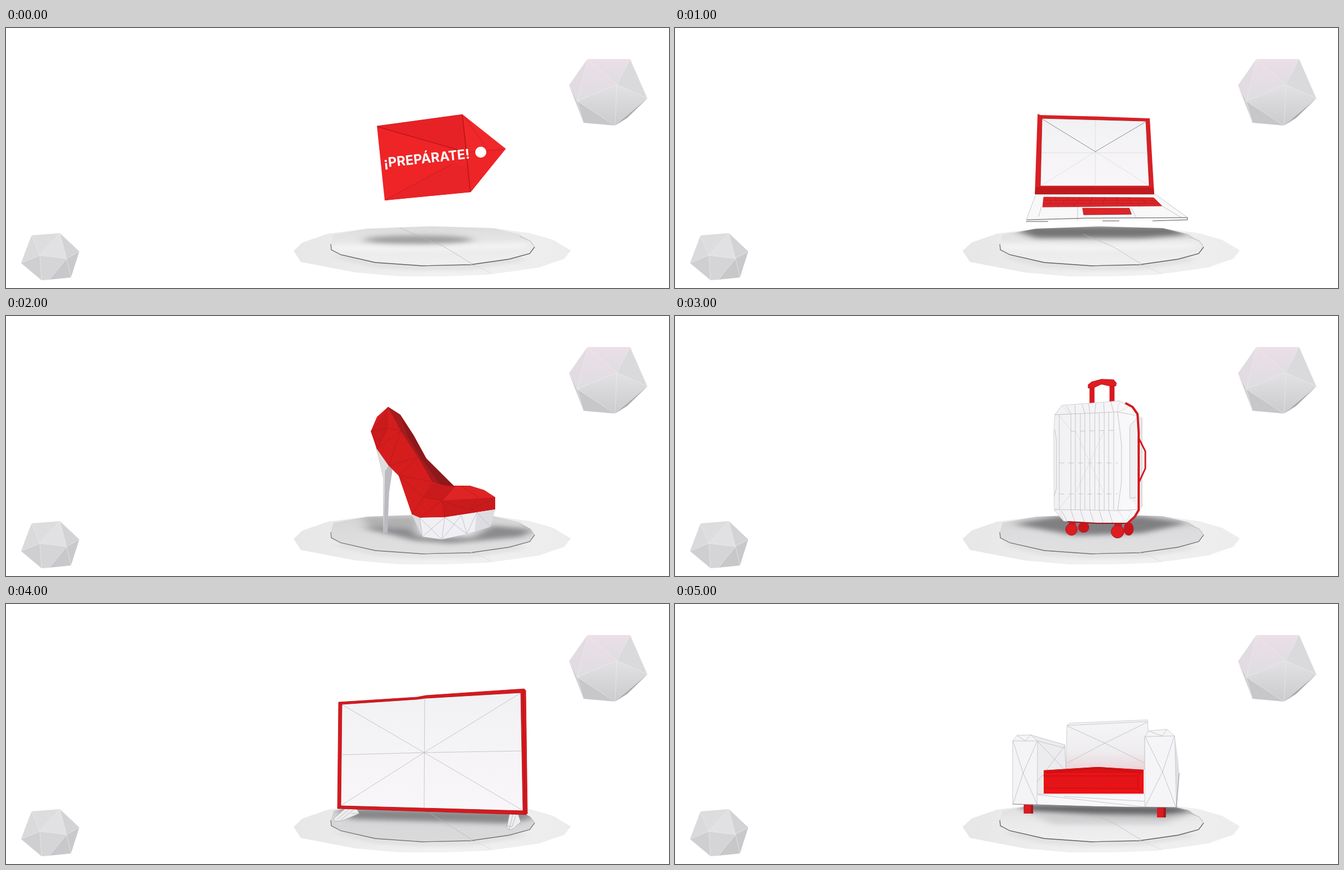
Write an HTML page that moves like this. It is 1194x469 px and loops after 6 s.

```html
<!DOCTYPE html>
<html lang="es">
<head>
<meta charset="utf-8">
<title>Paper showcase</title>
<style>
html, body { margin: 0; width: 100%; height: 100%; overflow: hidden; background: #fff; }
svg { display: block; width: 100%; height: 100%; }
.scene { visibility: hidden; animation: show 6s step-end infinite; animation-delay: calc((var(--i) - 6) * 1s); }
@keyframes show {
  0% { visibility: visible; }
  16.6666%, 100% { visibility: hidden; }
}
.line { fill: none; stroke: #b9b9bd; stroke-width: .8; }
.faint { fill: none; stroke: #d9d9dc; stroke-width: .8; }
.fold { fill: none; stroke: #9c1216; stroke-width: 1; }
.blur { filter: url(#soft); }
.facets { stroke-width: .5; stroke-linejoin: round; }
text { font: 700 24px Inter, "Open Sans", sans-serif; fill: #fff; }
</style>
</head>
<body>
<svg viewBox="0 0 1194 469" preserveAspectRatio="none">
<defs>
  <filter id="soft" x="-30%" y="-100%" width="160%" height="300%"><feGaussianBlur stdDeviation="9 4"/></filter>
  <clipPath id="plate"><path d="M518 402L534 387 580 371 650 362 765 357 878 361 943 370 985 382 1017 401 1006 416 960 432 868 445 790 448 710 448 630 441 531 422Z"/></clipPath>
  <clipPath id="top"><path d="M585 389L590 373 650 362 765 358 878 361 925 372 944 384 952 395 943 407 906 417 836 427 750 429 665 423 603 409 586 400Z"/></clipPath>
  <linearGradient id="rim"><stop stop-color="#e6e6e7"/><stop offset=".5" stop-color="#f2f2f2"/><stop offset="1" stop-color="#ececec"/></linearGradient>
  <linearGradient id="disc" x2="0" y2="1"><stop stop-color="#dadadb"/><stop offset=".5" stop-color="#eaeaeb"/><stop offset="1" stop-color="#f0f0f0"/></linearGradient>
  <linearGradient id="pink" x2="0" y2="1"><stop stop-color="#ecdfe8"/><stop offset="1" stop-color="#dedde0"/></linearGradient>
  <linearGradient id="stone" x2="0" y2="1"><stop stop-color="#e2e1e4"/><stop offset="1" stop-color="#cbcbce"/></linearGradient>
  <linearGradient id="paper" x2="0" y2="1"><stop stop-color="#f1f1f3"/><stop offset="1" stop-color="#f9f6f9"/></linearGradient>
  <linearGradient id="back" x2="0" y2="1"><stop stop-color="#f5f5f7"/><stop offset=".65" stop-color="#eeecef"/><stop offset="1" stop-color="#ecd4d8"/></linearGradient>
  <linearGradient id="shell"><stop stop-color="#f1f1f3"/><stop offset=".6" stop-color="#f5f5f7"/><stop offset="1" stop-color="#fafafb"/></linearGradient>
</defs>

<!-- large stone -->
<g class="facets">
  <path fill="url(#pink)" d="M1047 56H1124L1100 102Z"/>
  <path fill="url(#pink)" d="M1047 56L1100 102 1029 132Z"/>
  <path fill="#e2dbe1" d="M1047 56L1029 132 1014 103Z"/>
  <path fill="#dad9dc" d="M1124 56L1155 127 1100 102Z"/>
  <path fill="url(#stone)" d="M1100 102L1155 127 1097 176Z"/>
  <path fill="url(#stone)" d="M1029 132L1100 102 1097 176Z"/>
  <path fill="#c7c7ca" d="M1029 132L1097 176 1040 171Z"/>
  <path fill="#d0cfd3" d="M1014 103L1029 132 1040 171Z"/>
  <path fill="#aaaaad" d="M1155 127L1119 162 1097 176Z"/>
  <path fill="none" stroke="#ebeaed" d="M1047 56L1100 102 1124 56M1014 103L1029 132 1100 102 1155 127M1029 132L1097 176 1100 102M1047 56L1029 132 1040 171"/>
</g>

<!-- small stone -->
<g class="facets">
  <path fill="#dddde0" d="M46 374L97 370 61 410Z"/>
  <path fill="#e1e1e4" d="M97 370L109 416 61 410Z"/>
  <path fill="#d3d3d6" d="M97 370L132 403 109 416Z"/>
  <path fill="#dadadd" d="M46 374L61 410 27 424Z"/>
  <path fill="#cfcfd2" d="M27 424L61 410 64 455Z"/>
  <path fill="#d5d5d8" d="M61 410L109 416 78 454 64 455Z"/>
  <path fill="#c8c8cb" d="M109 416L117 450 78 454Z"/>
  <path fill="#c9c9cc" d="M132 403L117 450 109 416Z"/>
  <path fill="none" stroke="#ececee" d="M46 374L61 410 97 370 109 416 132 403M27 424L61 410 109 416 117 450M61 410L64 455M109 416L78 454"/>
</g>

<!-- pedestal -->
<g clip-path="url(#plate)">
  <path fill="url(#rim)" d="M510 350H1025V455H510Z"/>
  <path class="blur" fill="none" stroke="#d2d2d3" stroke-width="5" d="M600 411L665 427 750 433 836 431 930 416"/>
  <g clip-path="url(#top)"><path fill="url(#disc)" d="M580 355H955V432H580Z"/></g>
  <path fill="none" stroke="#5e5e60" stroke-width="1.3" d="M585 390L586 400 603 409 665 423 750 429 836 427 906 417 943 407 952 395"/>
  <path fill="none" stroke="#b5b5b7" d="M952 395L944 384 925 376M836 426L843 428"/>
  <path class="faint" d="M843 428L876 443"/>
</g>

<!-- tag -->
<g class="scene" style="--i:0">
  <g clip-path="url(#top)">
    <ellipse class="blur" cx="742" cy="382" rx="98" ry="8" fill="#8e8e90" opacity=".8"/>
    <path class="blur" fill="#fff" opacity=".5" d="M585 391L745 394 945 386 935 397 745 402 590 402Z"/>
    <path class="line" d="M708 360L788 394 842 427"/>
  </g>
  <path fill="#ee2427" d="M668 177L822 156 900 218 837 296 682 311Z"/>
  <path fill="#e72226" d="M668 177L822 156 829 218 815 221Z"/>
  <path fill="#f0282a" d="M822 156L900 218 832 224Z"/>
  <path fill="#e82428" d="M682 311L800 246 834 250 837 296Z"/>
  <path class="fold" stroke-width="1.5" d="M669 178L815 220M822 157L828 215 836 296"/>
  <path fill="none" stroke="#c61c20" stroke-width=".8" d="M683 310L805 245M899 218L832 224M824 158L866 216M668 177L822 156"/>
  <circle cx="855" cy="224" r="10" fill="#fff"/>
  <text transform="translate(681 251.5) rotate(-6)">¡PREPÁRATE!</text>
</g>

<!-- laptop -->
<g class="scene" style="--i:1">
  <g clip-path="url(#top)">
    <path class="blur" fill="#69696b" opacity=".9" d="M615 366L640 357H890L925 373 840 379 650 379Z"/>
    <path class="blur" fill="#fff" opacity=".5" d="M585 388L745 392 945 386 935 396 745 402 590 400Z"/>
    <path class="line" d="M735 372L788 394 842 427"/>
  </g>
  <path fill="#d91f24" d="M653 155L658 157 770 160 855 163 863 300H648Z"/>
  <path fill="#c0191e" d="M650 287L862 288 863 300H648Z"/>
  <path fill="url(#paper)" stroke="#a3161a" stroke-width=".8" d="M661 163L848 168 854 285H658Z"/>
  <path class="faint" d="M660 225H851M757 166V285M660 284L757 223 853 284"/>
  <path fill="none" stroke="#8d8d91" d="M661 164L757 223 848 169"/>
  <path fill="#f8f8f9" d="M649 301L866 302 923 342V347L860 347 632 349 633 345Z"/>
  <path class="line" d="M649 301H866L923 342M649 302L633 345M725 323V347M660 322L655 340M822 325L831 343M877 321L912 342"/>
  <path fill="none" stroke="#57575a" d="M633 346L740 343 923 342M632 349H672M770 348H800M860 348L923 346V342"/>
  <path fill="#dc2529" stroke="#b3191d" stroke-width=".7" d="M664 305L862 306 877 321 662 323Z"/>
  <path fill="none" stroke="#b3191d" stroke-width=".7" d="M663 311L867 311M663 317L872 316M685 305V311M707 305V311M729 305V311M751 305V311M773 305L774 311M795 305L797 311M817 305L820 311M839 306L844 311M676 311V317M700 311V317M724 311V317M748 311V317M772 311V317M796 311L798 317M820 311L823 317M844 311L848 317M690 317V323M719 317V323M805 317L807 322M834 317L837 322"/>
  <path fill="#dc2529" stroke="#a9191d" stroke-width=".8" d="M734 325L818 325 822 336 736 337Z"/>
</g>

<!-- shoe -->
<g class="scene" style="--i:2">
  <g clip-path="url(#top)">
    <path fill="#c9c9cb" opacity=".45" d="M580 355H955V432H580Z"/>
    <path class="blur" fill="#707073" opacity=".75" d="M640 380L730 383 745 398 840 400 875 378 950 385 930 398 800 410 735 405Z"/>
    <path class="blur" fill="#8a8a8c" opacity=".5" d="M640 362H740V386H660Z"/>
  </g>
  <path fill="#bcbcc0" d="M661 216L668 240 689 270 696 277 690 318 687 391H679V292L670 252Z"/>
  <path fill="#dedee1" d="M668 240L689 270 683 280 680 390 679 292Z"/>
  <path class="line" stroke="#88888c" d="M683 278L684 386M679 386H687M680 306L690 309"/>
  <path fill="#d51d1e" d="M688 164L710 178 734 215 757 257 806 306 835 306 861 314 881 327V349L790 363 745 364 731 358 707 288 689 270 668 240 657 208 668 182Z"/>
  <path fill="#8c191b" d="M688 164L710 178 734 215 757 257 808 308 790 306 768 299 742 254 711 207Z"/>
  <path fill="#a51b1d" d="M688 164L710 178 723 216 745 252 780 302 768 299 742 254 711 207Z"/>
  <path fill="#c91a1c" d="M657 208L688 164 687 202 668 240ZM770 302L808 308 785 333 752 327ZM785 333L881 327V349L790 363Z"/>
  <path fill="#df2425" d="M808 308L835 306 861 314 881 327 785 333Z"/>
  <path fill="none" stroke="#b4181b" stroke-width=".8" d="M657 208L687 202 711 207M687 202L668 240 711 207 689 270 742 254 707 288 768 299 752 327 707 288M752 327L731 358M752 327L785 333 745 364M785 333L790 363M808 308L785 333 835 350 881 327M820 307L850 326 835 350"/>
  <path fill="#f0f0f4" d="M731 358L745 364 790 363 881 349 872 380 830 393 785 403 750 398Z"/>
  <path fill="#dcdce1" d="M731 358L745 364 750 398ZM881 349L872 380 844 389 848 354Z"/>
  <path class="line" d="M745 364L750 398 790 363 785 403 820 359 830 393 848 354 872 380M745 364L785 403M790 363L830 393"/>
</g>

<!-- suitcase -->
<g class="scene" style="--i:3">
  <g clip-path="url(#top)">
    <path fill="#c8c8ca" opacity=".4" d="M580 355H955V432H580Z"/>
    <path class="blur" fill="#69696c" opacity=".8" d="M610 375L690 361H840L925 373 840 392 720 396Z"/>
  </g>
  <g fill="#c9151b">
    <circle cx="736" cy="381" r="10"/><ellipse cx="817" cy="384" rx="9" ry="12"/>
  </g>
  <path fill="#e9e9ec" d="M828 176L841 183V345L832 360Z"/>
  <path class="line" d="M841 183V345"/>
  <path fill="none" stroke="#d8181e" stroke-width="9" d="M751 159V127M787 155V123"/>
  <path fill="#df1c21" stroke="#ad1519" stroke-width=".8" d="M744 130V124L750 119 768 114 790 115 795 121 794 126 786 127 768 123 753 130Z"/>
  <path fill="url(#shell)" stroke="#c9c9cd" stroke-width=".8" d="M697 161L750 157 800 153 820 163 833 178 836 210V350L818 373H760L700 370 683 350 682 210 684 178Z"/>
  <path class="faint" fill="#e9e9ed" d="M684 178L697 161 710 177ZM683 350L692 349 700 370ZM800 153L818 163 797 174ZM797 349L822 352 812 373Z"/>
  <path fill="#f0f0f3" d="M819 198L830 186V340L819 329Z"/>
  <path class="line" d="M684 178L710 177 797 173 833 180M683 349L797 351 835 349M692 179V348M797 173L804 230V300L797 351M684 205L687 225V310L683 325M819 198V329L830 327M819 198L830 186"/>
  <path class="line" stroke-width="1" d="M713 176V349M721 176V349M730 176V349M738 175V349M747 175V350M756 175V350M764 175V350M773 174V350M781 174V350M790 174V350"/>
  <path class="line" d="M705 162L713 176M720 160L721 176M733 159L738 175M745 158L747 175M758 157L756 175M772 156L773 174M785 155L790 174M696 351L706 370M713 350L720 371M730 350L737 372M747 350L754 372M764 350L771 373M781 350L788 373"/>
  <path class="line" stroke-width="1.1" stroke-dasharray="9 8" d="M713 208L797 206M692 265H797M692 321H797"/>
  <path class="faint" d="M721 207L747 264 721 320M773 207L747 264 773 320M692 179L713 207M692 348L713 320"/>
  <path fill="none" stroke="#d61920" stroke-width="4" stroke-linejoin="round" d="M811 157L824 164 833 177 835 210V350L828 362 815 374"/>
  <path fill="none" stroke="#d61920" stroke-width="3" d="M836 222L847 244V275L836 299"/>
  <path fill="none" stroke="#a7171b" stroke-width="2" d="M707 371L760 374 815 374"/>
  <g fill="#dc1d22" stroke="#ad151a">
    <path d="M710 373H721V382H710ZM792 375H804V386H792Z"/>
    <circle cx="714" cy="385" r="10.5"/><circle cx="797" cy="389" r="11.5"/>
  </g>
</g>

<!-- television -->
<g class="scene" style="--i:4">
  <g clip-path="url(#top)">
    <path fill="#bebec0" opacity=".45" d="M580 355H955V432H580Z"/>
    <path class="blur" fill="#747477" opacity=".8" d="M595 368L940 376 950 386 905 396 800 393 620 388Z"/>
    <path class="line" d="M765 378L842 427"/>
  </g>
  <g fill="#eeeef1" stroke="#aaaaae" stroke-width=".8">
    <path d="M611 369L590 387 592 392 605 391 636 378 632 370Z"/>
    <path d="M907 378L902 402 906 408 914 405 927 393 922 379Z"/>
    <path fill="none" d="M618 370L596 389M626 371L602 390M636 378H622M913 379L906 407M919 379L911 402 903 400"/>
  </g>
  <path fill="#db171d" stroke="#a61519" stroke-width=".8" d="M599 177L740 168 756 165 933 153 936 156 939 378 936 380 597 369Z"/>
  <path fill="none" stroke="#a31418" d="M931 155L935 379M599 178L603 181M597 369L603 363"/>
  <path fill="url(#paper)" stroke="#941317" stroke-width=".8" d="M605 181L740 172 756 170 927 160 931 373 603 364Z"/>
  <path class="line" d="M606 182L753 268 930 372M604 363L753 268 926 161M604 272L753 268 929 265M754 170L753 368"/>
</g>

<!-- armchair -->
<g class="scene" style="--i:5">
  <g clip-path="url(#top)">
    <path class="blur" fill="#59595c" opacity=".9" d="M615 361L900 364 935 374 880 383 760 381 640 374Z"/>
    <path class="blur" fill="#b8b8ba" opacity=".5" d="M640 378H930L880 397H680Z"/>
    <path class="line" d="M755 380L788 394 842 427"/>
  </g>
  <path fill="#d81c20" d="M628 362H645V378H628ZM868 367H884V385H868Z"/>
  <path fill="#a91519" d="M641 362H645V378H641ZM880 367H884V385H880Z"/>
  <path fill="url(#back)" stroke="#c3c3c7" stroke-width=".8" d="M706 219L711 215 851 209 852 232 846 240V299H704Z"/>
  <path class="line" d="M706 219L850 212M706 220L774 251 851 213M774 251L706 287M774 251L846 287"/>
  <path fill="#ececef" d="M653 247L640 236 702 254 704 299 664 301V343H652Z"/>
  <path class="line" stroke-width="1" d="M640 236L702 254 704 298M653 247L702 260M653 248L700 297M702 256L653 320"/>
  <path fill="#f8f8fa" d="M652 343H846V367L652 362Z"/>
  <path class="line" d="M652 343H846M653 344L790 360 846 366M700 347L846 356"/>
  <path fill="#ef1216" d="M664 300L760 294 844 299V342H664Z"/>
  <path fill="#d81115" d="M664 300L760 294 844 299 838 305H668Z"/>
  <path fill="#e51418" d="M664 309H834V333H664Z"/>
  <path fill="none" stroke="#a91317" stroke-width=".8" d="M663 310H834V333L664 332M834 310L844 300M834 333L844 341M664 300L668 305 766 295 838 305"/>
  <path fill="#f4f4f6" stroke="#c2c2c6" stroke-width=".8" d="M608 247L616 237 640 236 653 247 652 362 608 361Z"/>
  <path class="line" d="M608 247H653M616 237L631 247 640 236M609 248L627 305 652 361M652 248L627 305 609 360"/>
  <path fill="#dfdfe3" d="M900 238L906 280 908 305 903 367Z"/>
  <path fill="#f5f5f7" stroke="#c2c2c6" stroke-width=".8" d="M846 239L853 229 886 226 900 238 903 367 846 366Z"/>
  <path class="line" d="M846 239L900 238M853 229L877 238 886 226M847 240L878 303 902 366M899 239L878 303 847 365"/>
  <path fill="none" stroke="#77777a" stroke-width=".8" d="M608 361L652 362 770 366 903 367 908 305"/>
</g>
</svg>
</body>
</html>
```
